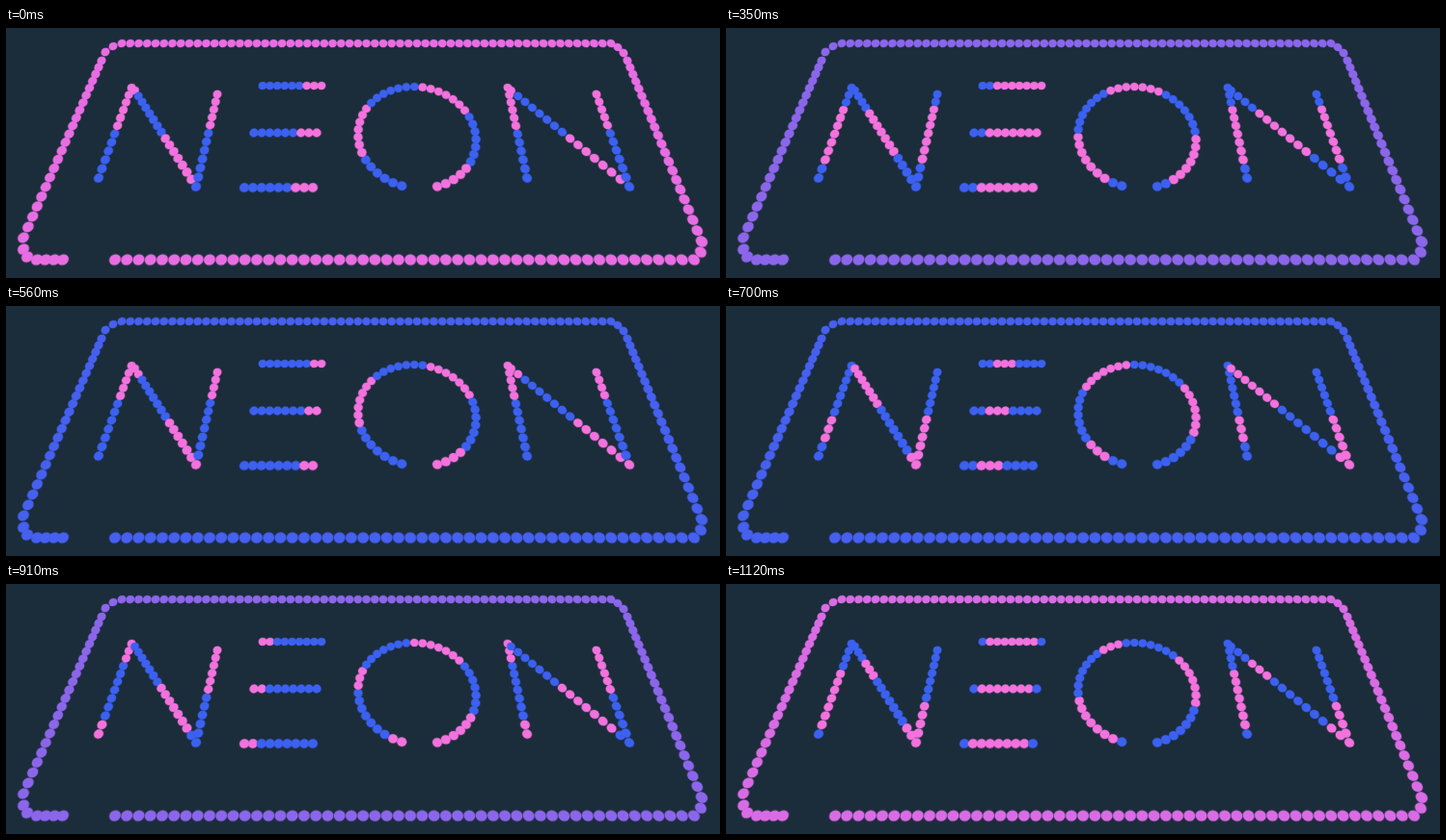
An HTML page for the animation above (1190 ms loop, 740 px wide and 260 px high).

```html
<!DOCTYPE html>
<html lang="en">
<head>
<meta charset="utf-8">
<title>Neon lights</title>
<style>
  html, body { margin: 0; width: 100%; height: 100%; overflow: hidden; background: #1b2d3a; }
  svg { display: block; width: 740px; height: 260px; }
  circle { fill: currentColor; stroke: currentColor; stroke-width: 1.8; stroke-opacity: .25; }
</style>
</head>
<body>
<svg id="stage" viewBox="0 0 740 260"><g id="border"></g><g id="letters"></g></svg>
<script>
const STEP = 70, STEPS = 17;
const PINK = '#f372de', BLUE = '#3c61f0';
const BORDER_PINK = [239, 110, 227], BORDER_BLUE = [56, 95, 240];
const border = document.getElementById('border');
const letters = document.getElementById('letters');

const mod = (n, m) => ((n % m) + m) % m;

// The sign lies on a tilted plane whose vanishing line is at y = -608.
const depthScale = y => (y + 608) / 848;

function addDot(parent, [x, y], radius) {
  const dot = document.createElementNS('http://www.w3.org/2000/svg', 'circle');
  const s = depthScale(y);
  const shear = 0.4 * s * (x - 370) / 848;
  dot.setAttribute('r', radius);
  dot.setAttribute('transform', `matrix(${s} 0 ${shear} ${0.96 * s} ${x} ${y})`);
  parent.appendChild(dot);
  return dot;
}

// Evenly spaced points on the plane between two screen points.
function row(x0, y0, x1, y1, count) {
  const w0 = 1 / depthScale(y0), w1 = 1 / depthScale(y1);
  return Array.from({ length: count }, (_, i) => {
    const t = i / (count - 1), a = (1 - t) * w0, b = t * w1;
    return [(a * x0 + b * x1) / (a + b), (a * y0 + b * y1) / (a + b)];
  });
}

// An open ring, its dots closer together at the far side.
function ring(count) {
  return Array.from({ length: count }, (_, i) => {
    const t = 2 * i / (count - 1) - 1;
    const a = (271.2 + 162.5 * t - 3.6 * Math.sin(Math.PI * t)) * Math.PI / 180;
    return [426 + 61 * Math.cos(a) + 4 * Math.sin(a), 114 + 53 * Math.sin(a)];
  });
}

// Three strokes; the diagonal stops one dot short of the last stroke.
function letterN(left, peak, foot, tip) {
  return [
    ...row(left, 156, peak, 62, 12),
    ...row(peak + 3.5, 65, foot, 165, 16).slice(0, -1),
    ...row(foot, 165, tip, 69, 12)
  ];
}

const frame = [
  ...row(113, 241, 713, 241, 50),
  ...row(720, 233, 721, 222, 2),
  ...row(721, 222, 644, 34, 22),
  ...row(640, 26, 634, 20, 2),
  ...row(627, 16, 120, 16, 59),
  ...row(111, 19, 103, 25, 2),
  ...row(99, 34, 18, 218, 22),
  ...row(18, 230, 22, 238, 2),
  ...row(32, 241, 59, 241, 4)
];

const tubes = [
  letterN(96, 130, 197, 219),
  row(266, 60, 327, 60, 9),
  row(257, 109, 322, 109, 9),
  row(247, 166, 318, 166, 9),
  ring(39),
  letterN(540, 520, 646, 612)
];

frame.forEach(point => addDot(border, point, 5.8));
const lamps = tubes.map(points => points.map(point => addDot(letters, point, 5.4)));

// Dots travelled by the chase: steady, a short hold, then a quicker run that slows.
function travel(step) {
  if (step < 7) return 2 * step;
  return 12 + Math.round(21 * ((step - 7) / 9) ** 0.86);
}

// Seven pink, seven blue; the rhythm slips once, after the hold.
function isPink(position) {
  const phase = position < -18 ? position + 4 : position - 6;
  return mod(phase, 14) < 7;
}

function borderColor(step) {
  const x = 1 - Math.abs(1 - 2 * mod(step - 0.5, STEPS) / STEPS);
  const mix = x - 0.06 * Math.sin(2 * Math.PI * x);
  return `rgb(${BORDER_PINK.map((c, i) => Math.round(c + (BORDER_BLUE[i] - c) * mix))})`;
}

function render(step) {
  const shift = travel(step);
  border.style.color = borderColor(step);
  lamps.forEach(tube => tube.forEach((dot, i) => {
    dot.style.color = isPink(i - shift) ? PINK : BLUE;
  }));
}

const start = performance.now();
let shown = -1;
function tick() {
  const step = Math.floor((performance.now() - start) / STEP) % STEPS;
  if (step !== shown) render(shown = step);
  requestAnimationFrame(tick);
}
tick();
</script>
</body>
</html>
```
